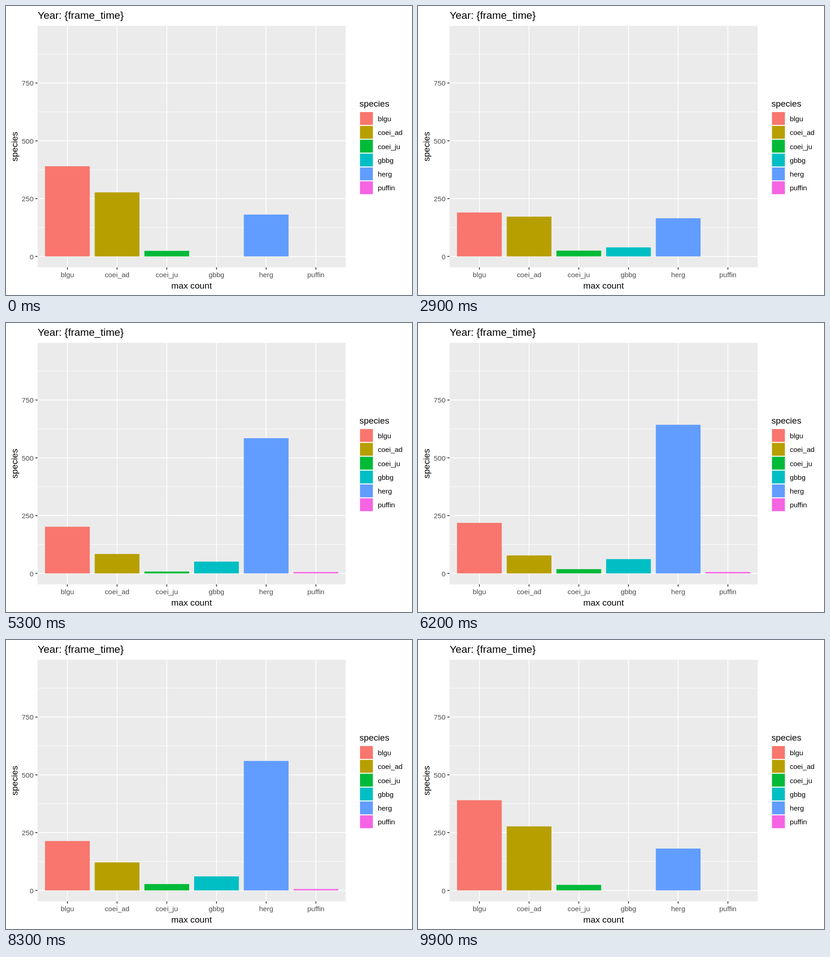
Animation of 885 by 632 pixels, one loop 10 s. Source, as an HTML page:

```html
<!DOCTYPE html>
<html lang="en">
<head>
<meta charset="utf-8">
<title>Species counts</title>
<style>
  html, body { margin: 0; width: 100%; height: 100%; overflow: hidden; background: #fff; }
  svg { display: block; width: 885px; height: 632px; font-family: "Liberation Sans", Arial, sans-serif; }
  .label { font-size: 15.4px; }
  .axis { fill: #4d4d4d; }
  .heading { font-size: 19.2px; }
  .title { font-size: 22.75px; }
  .middle { text-anchor: middle; }
  .end { text-anchor: end; }
</style>
</head>
<body>
<svg id="chart" viewBox="0 0 885 632"></svg>
<script>
const LOOP = 10000, TICK = 100, SURVEYS = 21;
const PANEL = { left: 68.8, right: 740.5, top: 43.4, bottom: 571.6 };
const PITCH = (PANEL.right - PANEL.left) / 6.2;
const BAR_WIDTH = PITCH * 0.9;
const BASE = 547.6, SCALE = 0.5055;

// Key counts by survey; the counts between them run in straight lines.
const species = [
  { name: "blgu", color: "#F8766D",
    keys: { 0: 390, 1: 345, 2: 760, 3: 302, 4: 232, 6: 190, 11: 202, 15: 242, 19: 185 } },
  { name: "coei_ad", color: "#B79F00",
    keys: { 0: 277, 3: 133, 6: 172, 11: 84, 15: 69, 19: 173 } },
  { name: "coei_ju", color: "#00BA38",
    keys: { 0: 24, 3: 35, 6: 25, 11: 8, 15: 33, 19: 22 } },
  { name: "gbbg", color: "#00BFC4",
    keys: { 0: 0, 1: 0, 3: 30, 6: 39, 11: 51, 15: 77, 19: 44 } },
  { name: "herg", color: "#619CFF",
    keys: { 0: 181, 3: 136, 6: 165, 7: 290, 8: 285, 9: 369, 10: 529, 11: 585, 12: 949,
      13: 490, 14: 525, 15: 625, 16: 590, 17: 560, 18: 709, 19: 534, 20: 594 } },
  { name: "puffin", color: "#F564E3",
    keys: { 0: 0, 2: 0, 3: 4, 4: 0, 9: 0, 10: 8, 11: 6, 18: 6, 19: 24, 20: 14 } }
];

const chart = document.getElementById("chart");

function add(tag, attrs, text = "") {
  const node = document.createElementNS("http://www.w3.org/2000/svg", tag);
  for (const key in attrs) node.setAttribute(key, attrs[key]);
  node.textContent = text;
  return chart.appendChild(node);
}
const line = (x1, y1, x2, y2, stroke, width) =>
  add("line", { x1, y1, x2, y2, stroke, "stroke-width": width });
const label = (text, x, y, style) => add("text", { x, y, class: style }, text);
const centerX = i => PANEL.left + (0.6 + i) * PITCH;
const countY = count => BASE - count * SCALE;

function drawPanel() {
  const { left, right, top, bottom } = PANEL;
  add("rect", { x: left, y: top, width: right - left, height: bottom - top, fill: "#EBEBEB" });
  for (let count = 125; count < 950; count += 250) {
    line(left, countY(count), right, countY(count), "#fff", 0.9);
  }
  for (let count = 0; count <= 750; count += 250) {
    const y = countY(count);
    line(left, y, right, y, "#fff", 1.75);
    line(left - 4.8, y, left, y, "#333", 1.75);
    label(count, 60, y + 5.9, "label axis end");
  }
  species.forEach(({ name }, i) => {
    const x = centerX(i);
    line(x, top, x, bottom, "#fff", 1.75);
    line(x, bottom, x, bottom + 4.8, "#333", 1.75);
    label(name, x, 592.5, "label axis middle");
  });
  label("Year: {frame_time}", 69, 28, "title");
  label("max count", 404.5, 618, "heading middle");
  label("species", 0, 0, "heading middle").setAttribute("transform", "translate(25 307.5) rotate(-90)");
}

function drawLegend() {
  label("species", 770.5, 220, "heading");
  species.forEach(({ name, color }, i) => {
    const y = 231.9 + i * 30.3;
    add("rect", { x: 771.6, y, width: 28.1, height: 28.1, fill: color });
    label(name, 810.5, y + 20, "label");
  });
}

// Surveys begin every 500 ms, with shorter gaps towards the end.
const startOf = i => 200 + 500 * i - (i > 9 ? 100 : 0) - 100 * Math.max(0, i - 17);

function surveyAt(time) {
  let i = SURVEYS - 1;
  while (i >= 0 && startOf(i) > time) i--;
  if (i < 0) return 0;
  const steps = i < 17 ? 3 : 2;
  const done = Math.floor((time - startOf(i)) / TICK) + 1;
  return i + Math.min(1, done / steps);
}

function countAt(keys, survey) {
  const points = [...Object.entries(keys).map(([at, count]) => [+at, count]), [SURVEYS, keys[0]]];
  const next = Math.max(1, points.findIndex(([at]) => at >= survey));
  const [[a, from], [b, to]] = points.slice(next - 1, next + 1);
  return from + (to - from) * (survey - a) / (b - a);
}

function draw(time) {
  const survey = surveyAt(time);
  for (const { keys, bar } of species) {
    const height = countAt(keys, survey) * SCALE;
    bar.setAttribute("y", BASE - height);
    bar.setAttribute("height", height);
  }
}

drawPanel();
species.forEach((item, i) => {
  item.bar = add("rect", { x: centerX(i) - BAR_WIDTH / 2, width: BAR_WIDTH, fill: item.color });
});
drawLegend();

const begin = performance.now();
function tick() {
  draw((performance.now() - begin) % LOOP);
  requestAnimationFrame(tick);
}
tick();
</script>
</body>
</html>
```
